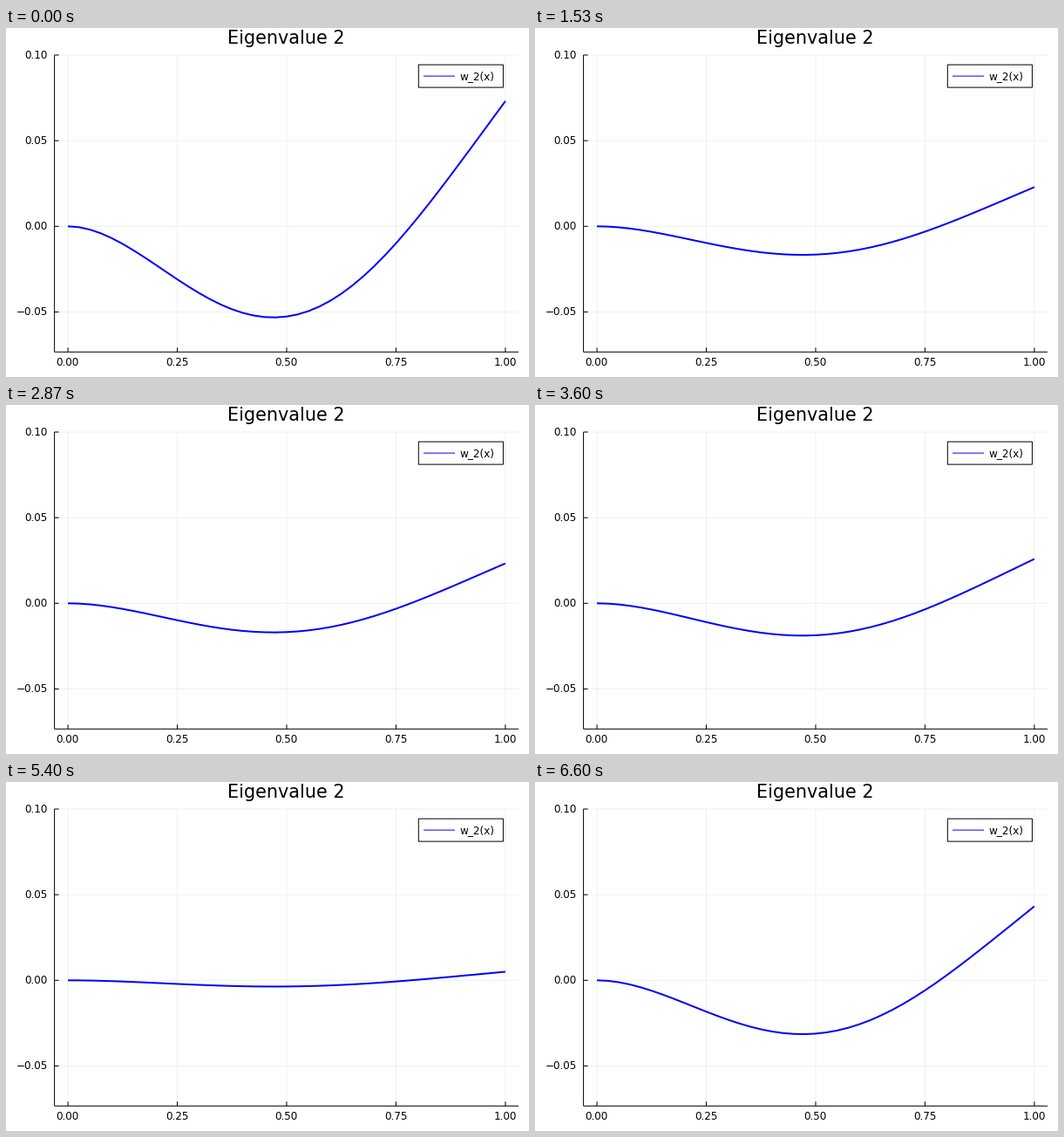
Animation of 600 by 400 pixels, one loop 6670 ms. Source, as a matplotlib script:

```python
import numpy as np
import matplotlib.pyplot as plt
from matplotlib.animation import FuncAnimation
from matplotlib.patches import Rectangle

W, H, DPI = 600, 400, 100
FRAMES, INTERVAL = 100, 66.66  # 15 frames per second
LEFT, RIGHT, TOP, BOTTOM = 55.6, 588, 31, 371.3
PT = 72 / DPI

plt.rcParams["font.family"] = "DejaVu Sans"
fig = plt.figure(figsize=(W / DPI, H / DPI), dpi=DPI, facecolor="white")
ax = fig.add_axes([0, 0, 1, 1])
ax.set_xlim(0, W)
ax.set_ylim(H, 0)
ax.axis("off")


def px(x):
    return 71.05 + 501.85 * x


def py(y):
    return 227.3 - 1963 * y


def line(xs, ys, color="black", width=1.0, **kw):
    kw.setdefault("solid_capstyle", "butt")
    return ax.plot(xs, ys, color=color, lw=width * PT, snap=False, **kw)[0]


def label(x, y, s, size=12, ha="center", **kw):
    ax.text(x, y, s, fontsize=size * PT, ha=ha, va="baseline", **kw)


def mode_shape(x, beta=4.6941, sigma=1.01847):
    """Second bending mode of a clamped beam, scaled to 1 at the tip."""
    b = beta * x
    phi = np.cosh(b) - np.cos(b) - sigma * (np.sinh(b) - np.sin(b))
    return phi / phi[-1] * (1 + 0.02 * (1 - x))


def spline(t, v, start, end, at):
    """Cubic spline through (t, v) with given end slopes."""
    n, h = len(t), np.diff(t)
    d = np.diff(v) / h
    A, r = np.eye(n), np.zeros(n)
    r[0], r[-1] = start, end
    for i in range(1, n - 1):
        A[i, i - 1:i + 2] = h[i], 2 * (h[i - 1] + h[i]), h[i - 1]
        r[i] = 3 * (h[i] * d[i - 1] + h[i - 1] * d[i])
    m = np.linalg.solve(A, r)
    k = np.clip(np.searchsorted(t, at, side="right") - 1, 0, n - 2)
    s, g = (at - t[k]) / h[k], h[k]
    return (v[k] * (1 + 2 * s) * (1 - s) ** 2 + g * m[k] * s * (1 - s) ** 2
            + v[k + 1] * s ** 2 * (3 - 2 * s) - g * m[k + 1] * s ** 2 * (1 - s))


# Tip deflection over time, in units of 0.001
knots = np.array([0, 11, 15, 21, 33, 42, 48, 54, 63, 66, 81, 84, 95, 99], float)
tips = np.array([73.1, 55.2, 42.7, 25.2, 13.0, 22.1, 27.6, 25.9,
                 12.9, 7.5, 5.0, 10.9, 37.9, 43.2])
amp = spline(knots, tips, 0, 0.87, np.arange(FRAMES)) / 1000

for x in (0, 0.25, 0.5, 0.75, 1):
    line([px(x)] * 2, [TOP, BOTTOM], "#f0f0f0")
    line([px(x)] * 2, [BOTTOM, BOTTOM - 5])
    label(px(x) - 0.5, 387, f"{x:.2f}")
for y in (-0.05, 0, 0.05, 0.1):
    line([LEFT, RIGHT], [py(y)] * 2, "#f0f0f0")
    line([LEFT, LEFT + 5], [py(y)] * 2)
    label(47.7, py(y) + 3.9, f"{y:.2f}".replace("-", "\u2212"), ha="right")
line([LEFT, LEFT], [TOP, BOTTOM])
line([LEFT, RIGHT], [BOTTOM, BOTTOM])
label(321.5, 18, "Eigenvalue 2", 20.8)

x = np.linspace(0, 1, 41)
shape = mode_shape(x)
curve = line(px(x), py(amp[0] * shape), "blue", 2, solid_joinstyle="round")

ax.add_patch(Rectangle((473.3, 42.1), 97.1, 26, fc="white", ec="black",
                       lw=PT, snap=False, zorder=3))
line([479, 515], [55.1, 55.1], "blue", zorder=4)
label(520.3, 59.5, "w_2(x)", ha="left", zorder=5)


def update(i):
    curve.set_ydata(py(amp[i] * shape))
    return curve,


anim = FuncAnimation(fig, update, frames=FRAMES, interval=INTERVAL,
                     repeat=True, repeat_delay=0)
plt.show()
```
